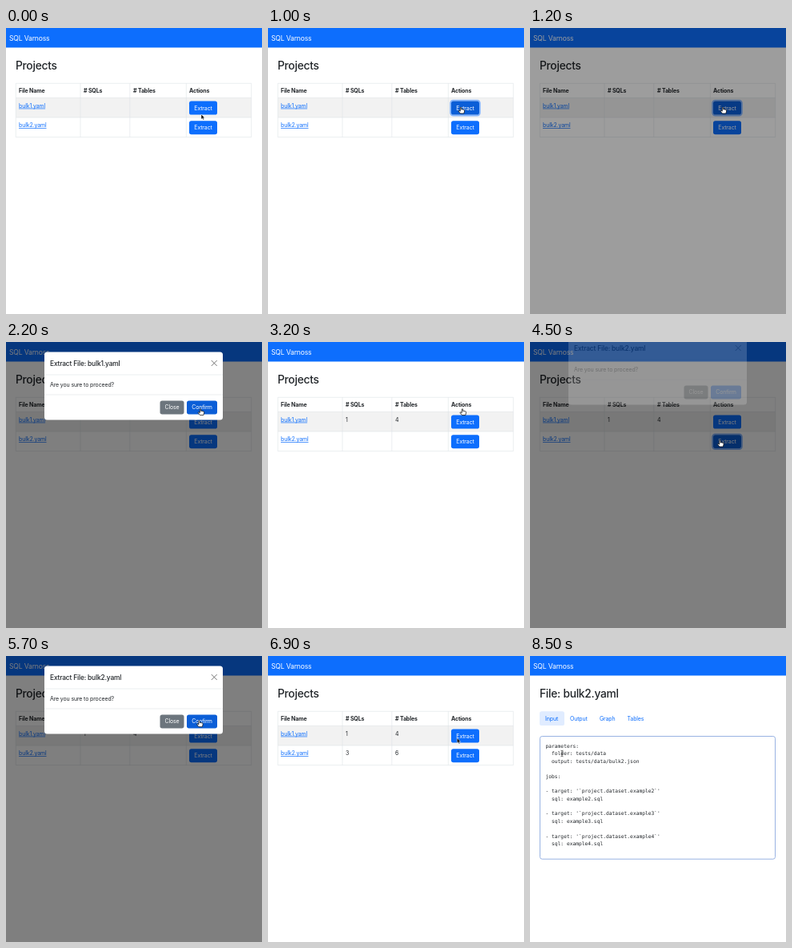
Write an HTML page that moves like this. It is 320x358 px and loops after 8600 ms.

```html
<!DOCTYPE html>
<html lang="en">
<head>
<meta charset="utf-8">
<title>Projects</title>
<style>
  html, body { margin: 0; width: 100%; height: 100%; overflow: hidden; background: #fff; }
  svg { display: block; width: 100%; height: 100%; }
  text { font: 400 7px Inter, "Open Sans", sans-serif; letter-spacing: -.02em; fill: #212529; white-space: pre; }
  .brand { font-size: 8.6px; fill: #fff; }
  .title { font-size: 13.8px; font-weight: 500; }
  .head { font-weight: 700; }
  .modal-title { font-size: 8.4px; font-weight: 500; }
  .link, .tab { fill: #0d6efd; }
  .link { text-decoration: underline; }
  .label { fill: #fff; text-anchor: middle; }
  .code { font: 6.27px "DejaVu Sans Mono", monospace; letter-spacing: 0; }
  .rule { stroke: #dee2e6; stroke-width: .6; fill: none; }
</style>
</head>
<body>
<svg id="stage" viewBox="0 0 320 358"></svg>
<script>
const LOOP = 8600, STEP = 100;
const BLUE = '#0d6efd', BLUE_DARK = '#0b5ed7';

const text = (x, y, str, cls = '', id = '') =>
  `<text x="${x}" y="${y}" class="${cls}" id="${id}">${str}</text>`;
const box = (x, y, w, h, fill, r = 0, extra = '') =>
  `<rect x="${x}" y="${y}" width="${w}" height="${h}" rx="${r}" fill="${fill}" ${extra}/>`;
const rule = d => `<path class="rule" d="${d}"/>`;
const button = (id, x, y, w, label, fill = BLUE) =>
  box(x - .9, y - .9, w + 1.8, 18.8, 'none', 3.4, `id="${id}Ring" stroke="#86b6fe" stroke-width="1.8"`) +
  box(x, y, w, 17, fill, 2.7, `id="${id}"`) +
  text(x + w / 2, y + 11, label, 'label');

const projectsPage = () =>
  text(12, 52, 'Projects', 'title') +
  box(12.3, 87.4, 294.4, 24.6, '#f2f2f2') +
  rule('M12.3 69.3H306.7V136.6H12.3ZM12.3 87.4H306.7M12.3 112H306.7M93 69.3V136.6M154.8 69.3V136.6M225.3 69.3V136.6') +
  ['File Name', '# SQLs', '# Tables', 'Actions']
    .map((name, i) => text([16, 97, 159, 229][i], 81, name, 'head')).join('') +
  [1, 2].map(n => {
    const y = 75 + 24.6 * n;
    return text(16, y, `bulk${n}.yaml`, 'link') +
      `<g id="counts${n}">${text(97, y, n === 1 ? 1 : 3)}${text(159, y, n === 1 ? 4 : 6)}</g>` +
      button(`extract${n}`, 229, y - 8, 35, 'Extract');
  }).join('');

const jobLines = [2, 3, 4].flatMap(n =>
  ['', `- target: '\`project.dataset.example${n}\`'`, `  sql: example${n}.sql`]);
const config = ['parameters:', '  folder: tests/data', '  output: tests/data/bulk2.json', '', 'jobs:', ...jobLines];

const filePage = () =>
  text(12, 52, 'File: bulk2.yaml', 'title') +
  box(12, 69.3, 31, 17.8, '#e0ecff', 2.7, 'id="activeTab"') +
  ['Input', 'Output', 'Graph', 'Tables']
    .map((name, i) => text([19, 50, 87, 121.5][i], 80.7, name, 'tab')).join('') +
  box(12.5, 100.5, 294, 153.7, '#fff', 2.7, 'stroke="#8eabe0" stroke-width=".9"') +
  config.map((line, i) => text(19.5, 115 + i * 9.38, line, 'code')).join('');

const modal = () =>
  box(48, 12.5, 223, 85, '#fff', 3.5) +
  rule('M48 41H271M48 66H271') +
  text(55, 29.8, '', 'modal-title', 'modalTitle') +
  '<path d="M257 23.3l6.4 6.4m0-6.4l-6.4 6.4" stroke="#666" stroke-width=".9" stroke-linecap="round"/>' +
  text(55, 56, 'Are you sure to proceed?') +
  button('close', 192.5, 73.4, 30, 'Close', '#6c757d') +
  button('confirm', 226, 73.4, 38, 'Confirm');

const cursors = () =>
  '<path id="arrow" d="M0 0V6.2L1.5 4.9L2.5 7.1L3.6 6.6L2.6 4.5H4.5Z" fill="#000" stroke="#fff" stroke-width=".5"/>' +
  '<path id="hand" d="M-.7 .6Q0-.5 .7 .6V3L1.8 2.8L4 3.4Q4.9 3.7 4.6 5L3.9 8H-.6L-2.8 5.2Q-3 4-1.8 4.4L-.7 5.2Z" fill="#fff" stroke="#000" stroke-width=".7" stroke-linejoin="round"/>' +
  '<path id="ibeam" d="M-1.5-1.8Q0-1.8 0-1Q0-1.8 1.5-1.8M0-1V5M-1.5 5.8Q0 5.8 0 5Q0 5.8 1.5 5.8M-.9 2.6H.9" fill="none" stroke="#333" stroke-width=".7"/>';

const stage = document.getElementById('stage');
stage.innerHTML =
  box(0, 0, 320, 358, '#fff') +
  box(0, 0, 320, 24.5, BLUE) +
  text(4, 15.6, 'SQL Varnoss', 'brand') +
  `<g id="projects">${projectsPage()}</g><g id="file">${filePage()}</g>` +
  box(0, 0, 320, 358, '#000', 0, 'id="backdrop"') +
  `<g id="modal">${modal()}</g><g id="cursor">${cursors()}</g>`;

const el = {};
stage.querySelectorAll('[id]').forEach(node => { if (node.id) el[node.id] = node; });

const clamp = v => Math.max(0, Math.min(1, v));
const show = (id, on) => el[id].setAttribute('display', on ? 'inline' : 'none');
const set = (id, name, value) => el[id].setAttribute(name, value);

// Pointer hotspot: time, x, y
const path = [
  [0, 244, 108], [300, 241, 99], [1600, 241, 99], [2100, 243, 83.5], [3400, 243, 83.5],
  [4000, 237.5, 123], [5000, 237.5, 123], [5600, 241.5, 80.5], [6300, 241.5, 83],
  [7000, 236, 104], [7300, 36, 115], [7500, 36, 115], [7800, 40, 120], [LOOP, 40, 120]
];
const kinds = [[0, 'arrow'], [200, 'hand'], [1600, 'arrow'], [1900, 'hand'], [5100, 'arrow'],
  [5400, 'hand'], [6400, 'arrow'], [7300, 'hand'], [8100, 'ibeam']];

function pointerAt(t) {
  const i = path.findIndex(p => p[0] > t);
  const [t0, x0, y0] = path[i - 1], [t1, x1, y1] = path[i];
  const u = (t - t0) / (t1 - t0), k = u * u * (3 - 2 * u);
  return [x0 + (x1 - x0) * k, y0 + (y1 - y0) * k];
}

const dialogs = [
  { row: 1, hover: 200, press: 700, fade: 1085, open: 1372, confirm: 2500, reload: 3100 },
  { row: 2, hover: 3900, press: 4200, fade: 4188, open: 4473, confirm: 5900, reload: 6200 }
];

function drawButton(id, hovered, focused) {
  set(id, 'fill', hovered ? BLUE_DARK : BLUE);
  show(id + 'Ring', focused);
}

function render(t) {
  const onFile = t >= 8100;
  show('projects', !onFile);
  show('file', onFile);
  set('activeTab', 'fill', t >= 8500 ? '#e0ecff' : '#f0f6ff');
  show('closeRing', false);

  const d = dialogs[t < dialogs[0].reload ? 0 : 1];
  const live = t < d.reload;
  const slide = 1 - (1 - clamp((t - d.open) / 300)) ** 1.72;
  set('backdrop', 'opacity', live ? clamp((t - d.fade) / 150) / 2 : 0);
  set('modal', 'opacity', live ? clamp((t - d.open) / 150) : 0);
  set('modal', 'transform', `translate(0 ${-22.3 * (1 - slide)})`);
  el.modalTitle.textContent = `Extract File: bulk${d.row}.yaml`;

  for (const { row, hover, press, open, reload } of dialogs) {
    show('counts' + row, t >= reload);
    drawButton('extract' + row, t >= hover && t < open + 300, t >= press && t < open + 300);
  }
  const [x, y] = pointerAt(t);
  drawButton('confirm', live && t > d.open && y < 91, t >= d.confirm);

  const kind = kinds.filter(k => k[0] <= t).pop()[1];
  for (const id of ['arrow', 'hand', 'ibeam']) show(id, id === kind);
  set('cursor', 'transform', `translate(${x} ${y})`);
}

const start = performance.now();
function tick() {
  const t = (performance.now() - start) % LOOP;
  render(Math.floor(t / STEP) * STEP);
  requestAnimationFrame(tick);
}
tick();
</script>
</body>
</html>
```
